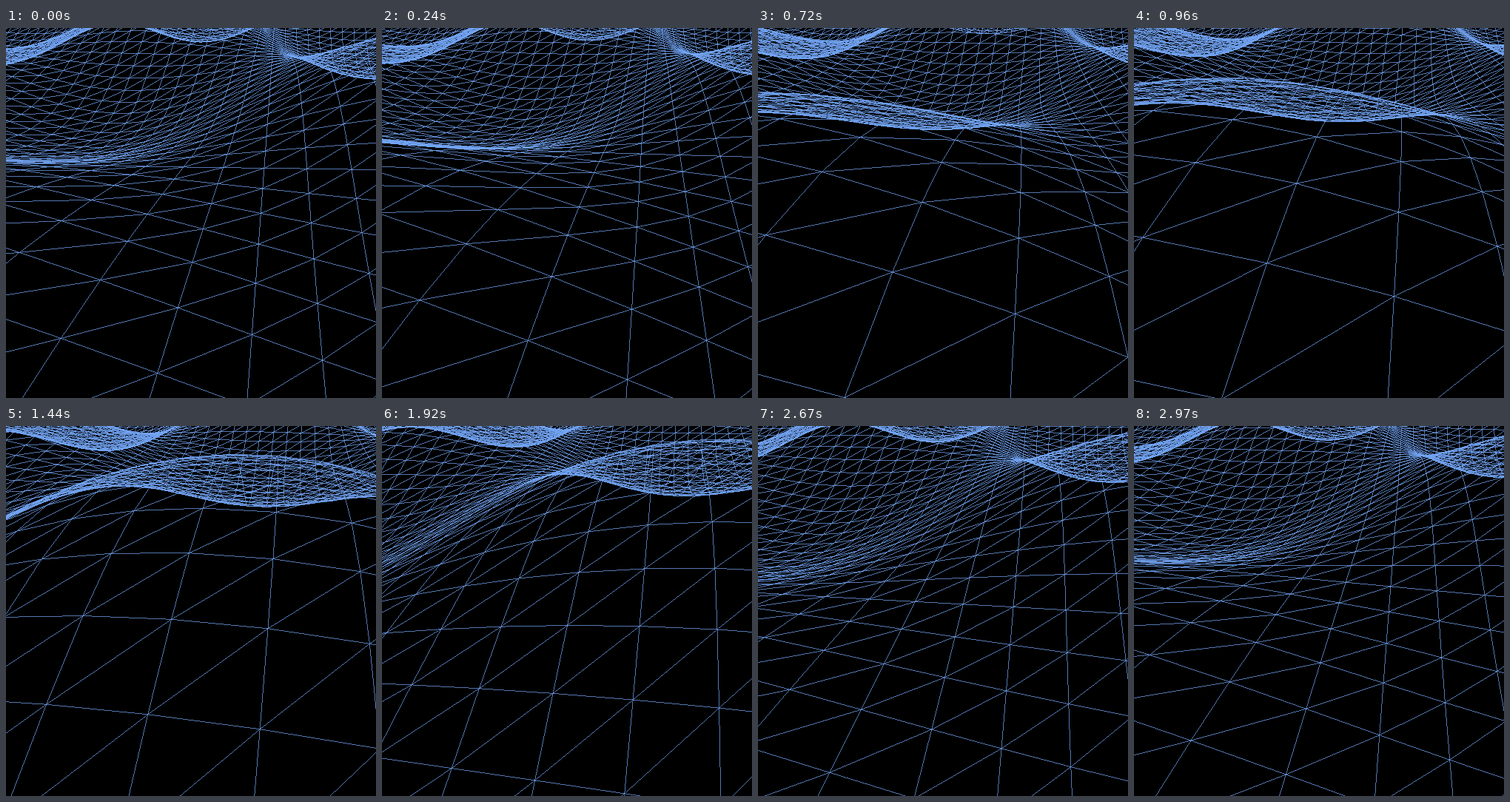
Write an HTML page with a canvas that moves like this. It is 500 by 500 pixels and loops after 3000 ms.

```html
<!DOCTYPE html>
<html lang="en">
<head>
<meta charset="utf-8">
<title>Wireframe waves</title>
<style>
  html, body { margin: 0; width: 100%; height: 100%; overflow: hidden; background: #000; }
  canvas { display: block; width: 500px; height: 500px; }
</style>
</head>
<body>
<canvas id="stage" width="500" height="500"></canvas>
<script>
const SIZE = 500, LOOP = 3000, STEP = 30;
const ctx = document.getElementById('stage').getContext('2d');
const image = ctx.createImageData(SIZE, SIZE);
const pixels = new Uint32Array(image.data.buffer);
const hits = new Uint8Array(SIZE * SIZE);
const RAD = Math.PI / 180;

// Translucent lines: a pixel brightens with every line that crosses it.
const INK = [115, 165, 245], ALPHA = 0.72, LEVELS = 6;
const shades = Array.from({ length: LEVELS + 1 }, (_, n) => {
  const [r, g, b] = INK.map(c => Math.round(c * (1 - (1 - ALPHA) ** n)));
  return (255 << 24 | b << 16 | g << 8 | r) >>> 0;
});

// Grid range: columns run left to right, rows run away from the viewer.
const COL0 = -50, COL1 = 26, ROW0 = -3, ROW1 = 43;
const COLS = COL1 - COL0 + 1, ROWS = ROW1 - ROW0 + 1;

// Vertices slide along lines through the nadir when the surface rises.
const NADIR = { x: 267, y: 839 };
const AMP = 0.382, TURN = 11.46 * RAD;

const px = new Float64Array(COLS * ROWS);
const py = new Float64Array(COLS * ROWS);
const depth = new Float64Array(COLS * ROWS);

function project(angle) {
  let k = 0;
  for (let j = ROW0; j <= ROW1; j++) {
    for (let i = COL0; i <= COL1; i++, k++) {
      const wave = Math.cos(angle + 58.5 * RAD - TURN * (i + j))
                 - Math.cos(TURN * (i - j) + 41.5 * RAD);
      const w = 2.256 - 0.0625 * i + 0.364 * j + AMP * wave;
      depth[k] = w;
      px[k] = NADIR.x + 1000 * (-0.0753 + 0.2205 * i + 0.0366 * j) / w;
      py[k] = NADIR.y - 1000 * (1 - 0.056 * i + 0.332 * j) / w;
    }
  }
}

// One-pixel line without smoothing, clipped to the stage.
function line(a, b) {
  if (depth[a] < 0.1 || depth[b] < 0.1) return;
  let x0 = px[a], y0 = py[a], x1 = px[b], y1 = py[b];
  if (Math.max(x0, x1) < 0 || Math.min(x0, x1) > SIZE ||
      Math.max(y0, y1) < 0 || Math.min(y0, y1) > SIZE) return;
  const wide = Math.abs(x1 - x0) > Math.abs(y1 - y0);
  if (!wide) [x0, y0, x1, y1] = [y0, x0, y1, x1];
  if (x0 > x1) [x0, y0, x1, y1] = [x1, y1, x0, y0];
  const slope = x1 > x0 ? (y1 - y0) / (x1 - x0) : 0;
  const end = Math.min(SIZE, Math.round(x1));
  for (let u = Math.max(0, Math.round(x0)); u < end; u++) {
    const v = Math.floor(y0 + (u + 0.5 - x0) * slope);
    if (v < 0 || v >= SIZE) continue;
    const p = wide ? v * SIZE + u : u * SIZE + v;
    if (hits[p] < LEVELS) hits[p]++;
  }
}

function draw(time) {
  project(2 * Math.PI * time / LOOP);
  hits.fill(0);
  for (let j = 0; j < ROWS; j++) {
    for (let i = 0; i < COLS; i++) {
      const k = j * COLS + i;
      const right = i + 1 < COLS, far = j + 1 < ROWS;
      if (right) line(k, k + 1);
      if (far) line(k, k + COLS);
      if (right && far) line(k, k + COLS + 1);
    }
  }
  for (let p = 0; p < hits.length; p++) pixels[p] = shades[hits[p]];
  ctx.putImageData(image, 0, 0);
}

const start = performance.now();
let shown = -1;
function tick() {
  const time = Math.floor((performance.now() - start) % LOOP / STEP) * STEP;
  if (time !== shown) draw(shown = time);
  requestAnimationFrame(tick);
}
tick();
</script>
</body>
</html>
```
